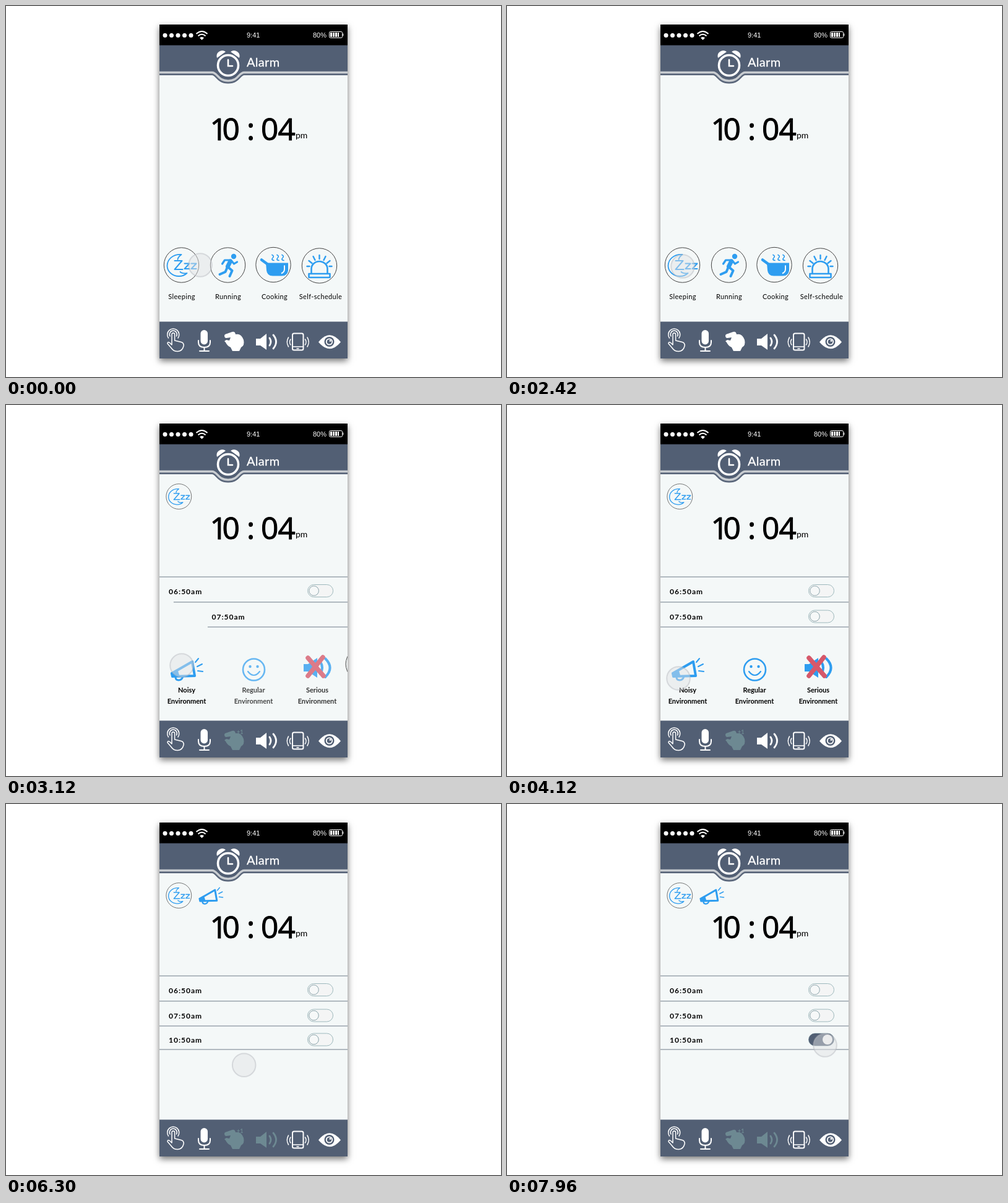
Animation, 800 px wide and 600 px high, one loop 8 s. Source, as an HTML page:

```html
<!DOCTYPE html>
<html lang="en">
<head>
<meta charset="utf-8">
<title>Alarm</title>
<style>
  html, body { margin: 0; width: 100%; height: 100%; overflow: hidden; background: #fff; }
  #phone { position: absolute; left: 248px; top: 30px; width: 304px; height: 540px; box-shadow: 0 4px 10px rgba(0, 0, 0, .55); }
  svg { position: absolute; left: 0; top: 0; font-family: Lato, "Open Sans", sans-serif; }
  .blue { fill: #2e9df0; }
  .line { fill: none; stroke: #2e9df0; stroke-linecap: round; stroke-linejoin: round; }
  .ring { fill: none; stroke: #444; }
  .label { font-size: 11px; letter-spacing: .35px; text-anchor: middle; }
  .bold { font-size: 11px; font-weight: 700; text-anchor: middle; }
  .time { font-size: 12px; font-weight: 700; letter-spacing: 1px; }
  .rule { stroke: #9ba5ae; stroke-width: 1.6; }
  .nav { color: #fff; }
  .nav .f { fill: currentColor; }
  .nav .s { fill: none; stroke: currentColor; stroke-width: 2; stroke-linecap: round; stroke-linejoin: round; }
  .nav .thin { stroke-width: 1.5; }
  .nav .thick { stroke-width: 2.8; }
  .clock { font: 49.5px "Open Sans", "Noto Sans", sans-serif; stroke: #000; stroke-width: 1; stroke-linejoin: round; }
  .status { font: 11px "Liberation Sans", Arial, sans-serif; fill: #fff; }
</style>
</head>
<body>
<div id="phone"></div>
<svg width="800" height="600" viewBox="0 0 800 600">
  <defs>
    <clipPath id="screen"><path d="M248 30H552V570H248Z"/></clipPath>
    <g id="zzz">
      <circle class="ring" r="28.2"/>
      <path class="line" stroke-width="1.8" d="M0-17C-14-18-23-9-23 1S-14 18-4 18C2 18 6 16 9 13C5 14 0 13-2 11M0-17C-4-14-6-12-6-9"/>
      <path class="line" stroke-width="2" d="M-11-7H1L-11 7H2M5-2.500H13L5 6H13M16-2.500H24L16 6H24"/>
    </g>
    <g id="runner">
      <circle class="ring" r="28.2"/>
      <circle class="blue" cx="9.5" cy="-14" r="4.2"/>
      <path class="line" stroke-width="7" d="M4-6L0 2"/>
      <path class="line" stroke-width="3.2" d="M5-8L10-2L15-5M3-8L-5-8L-9-2"/>
      <path class="line" stroke-width="4" d="M0 3L7 9L3 18M-1 4L-4 11L-13 15"/>
    </g>
    <g id="pan">
      <circle class="ring" r="28.2"/>
      <path class="line" stroke-width="4.500" d="M-19-8L-8 0"/>
      <path class="blue" d="M-12-3H24V9Q23 18 14 18H-1Q-10 18-11 9Z"/>
      <path fill="none" stroke="#fff" stroke-width="2" d="M18 1V7Q18 12 13 14"/>
      <path class="line" stroke-width="1.7" d="M-2-16q4 2 1 5t2 4M6-16q4 2 1 5t2 4M14-16q4 2 1 5t2 4"/>
    </g>
    <g id="siren">
      <circle class="ring" r="28.2"/>
      <path class="line" stroke-width="2.6" d="M-13 12V5A13 12 0 0 1 13 5V12M-17 13H17V19H-17Z"/>
      <path class="line" stroke-width="2.4" d="M0-17V-11M-10-15L-7-9M10-15L7-9M-17-8L-12-4M17-8L12-4M-20 1H-16M20 1H16"/>
    </g>
    <g id="megaphone">
      <path class="line" stroke-width="4" stroke-linejoin="miter" d="M-24 7L9-12L13 11L-23 12Z"/>
      <path class="blue" d="M-26 6L-15 0L-11 13H-24Z"/>
      <path class="line" stroke-width="3" d="M-18 13Q-18 18-13 18T-6 12"/>
      <path class="line" stroke-width="2" d="M14-11L19-17M17-4L25-8M18 3L26 4"/>
    </g>
    <g id="toggle">
      <rect x=".5" y="-10" width="41" height="20" rx="10" fill="#f4f5f5" stroke="#9db8bc"/>
      <circle cx="10.5" r="7.8" fill="#f6f8f8" stroke="#8aa3aa"/>
    </g>
  </defs>

  <g clip-path="url(#screen)">
    <path fill="#f4f8f8" d="M248 64H552V570H248Z"/>
    <path d="M248 30H552V64H248Z"/>
    <g fill="#fff">
      <circle cx="257" cy="47.5" r="3.5"/><circle cx="267.5" cy="47.5" r="3.5"/><circle cx="278" cy="47.5" r="3.5"/>
      <circle cx="288.5" cy="47.5" r="3.5"/><circle cx="299" cy="47.5" r="3.5"/>
      <path d="M313 51.5Q316.5 48.5 320 51.5L316.5 55Z"/>
      <path d="M524 43h3v7h-3zm4 0h3v7h-3zm4 0h3v7h-3zm4 0h2v7h-2zM544.5 44.5h1v4h-1z"/>
      <g fill="none" stroke="#fff">
        <path stroke-width="2" d="M307.5 45Q316.5 37 325.5 45M310.5 48.5Q316.5 43 322.5 48.5"/>
        <rect x="522.5" y="41.5" width="21" height="10" rx="2"/>
      </g>
    </g>
    <text class="status" x="389" y="51">9:41</text>
    <text class="status" x="496" y="51">80%</text>

    <path fill="none" stroke="#5b677b" stroke-width="7" d="M240 108.5H333C342 108.5 342 122 359 122S376 108.5 385 108.5H560"/>
    <path fill="#525f74" stroke="#c9cdd1" stroke-width="3.4" d="M240 61V107.5H333C342 107.5 342 121 359 121S376 107.5 385 107.5H560V61Z"/>
    <path d="M248 58H552V63.5H248Z"/>
    <g fill="none" stroke="#fff" stroke-linecap="round">
      <circle cx="359" cy="96" r="16.5" stroke-width="3.6"/>
      <path stroke-width="2.6" d="M359 87V97H366"/>
      <path fill="#fff" stroke="none" d="M341 84A9 9 0 0 1 355 74ZM377 84A9 9 0 0 0 363 74Z"/>
    </g>
    <text x="389" y="98" font-size="20" letter-spacing=".3" fill="#fff" stroke="#fff" stroke-width=".3">Alarm</text>

    <text class="clock" x="329.5 349.5 389 412 439.5" y="216.5">10:04</text>
    <text x="468" y="214" font-size="14">pm</text>

    <use id="fly" href="#megaphone"/>
    <g id="rows"></g>
    <g id="self"><use href="#siren" x="506.5" y="420"/><text class="label" x="508.5" y="474">Self-schedule</text></g>
    <g id="cook"><use href="#pan" x="432" y="418.5"/><text class="label" x="434" y="474">Cooking</text></g>
    <g id="run"><use href="#runner" x="358.5" y="419"/><text class="label" x="359" y="474">Running</text></g>
    <text id="sleepLabel" class="label" x="284" y="474">Sleeping</text>

    <g id="noisy">
      <use href="#megaphone" x="292" y="427"/>
      <text class="bold" x="292" y="465">Noisy</text><text class="bold" x="292" y="483">Environment</text>
    </g>
    <g id="regular">
      <circle class="line" stroke-width="2.6" cx="400.5" cy="428" r="17.5"/>
      <circle class="blue" cx="394.5" cy="423" r="2.2"/><circle class="blue" cx="406.5" cy="423" r="2.2"/>
      <path class="line" stroke-width="2.2" d="M391 431Q400.5 443 410 431"/>
      <text class="bold" x="400" y="465">Regular</text><text class="bold" x="400" y="483">Environment</text>
    </g>
    <g id="serious">
      <path class="blue" d="M481 419H488L503 409V441L488 431H481Z"/>
      <path class="line" stroke-width="4" d="M508 415Q514 425 508 435M516 410Q531 425 516 440"/>
      <path fill="none" stroke="#d6586a" stroke-width="7.5" stroke-linecap="round" d="M488 409L513 438M512 408L488 438"/>
      <text class="bold" x="503" y="465">Serious</text><text class="bold" x="503" y="483">Environment</text>
    </g>
    <use id="sleep" href="#zzz"/>

    <path fill="#525f74" d="M248 510.5H552V570H248Z"/>
    <text x="286" y="576.5" font-size="10" letter-spacing=".5" fill="#fff" opacity=".5">Alarm modes and hints</text>
    <g class="nav">
      <path class="s thin" d="M268 548V531a2.3 2.3 0 0 1 4.600 0V541L283 543.500Q288 545 287 550Q285 558 278 558.500Q271 559 267 553L261 546Q261 542 265 545L268 548M265 534a6 6 0 1 1 10.500 0M262.500 537a9.500 9.500 0 1 1 15.500 0"/>
    </g>
    <g class="nav">
      <rect class="f" x="314.5" y="524" width="11.5" height="23.5" rx="5.7"/>
      <path class="s" d="M311 541V544Q311 552 320.5 552T330 544V541M320.5 552V557M313 558H328"/>
    </g>
    <g class="nav" id="pinch">
      <path class="f" d="M353 533Q353 531 357 530L364 527.5Q370 525 371 531Q380 529 384 540Q386 549 380 552L377 558H366L363 552Q357 549 355 544L353 542L356 540L361 541L363 536L356 537Q353 537 353 533Z"/>
      <text id="plus" class="f" x="373" y="532" font-size="9" font-weight="700">+1</text>
    </g>
    <g class="nav" id="sound">
      <path class="f" d="M404 538H411L421 530V556L411 549H404Z"/>
      <path class="s thick" d="M426 537Q430 543 426 549M432 532Q441 543 432 554"/>
    </g>
    <g class="nav">
      <rect class="s" x="463" y="529.5" width="17.5" height="27" rx="2.5"/>
      <path class="s thin" d="M463 551H480M470 554H473M460 539Q457 543.5 460 548M456.5 536Q452 543.5 456.5 551M483.5 539Q486.5 543.5 483.5 548M487 536Q491.5 543.5 487 551"/>
    </g>
    <g class="nav">
      <path class="f" d="M505 543.5Q523 521 541 543.5Q523 565 505 543.5Z"/>
      <circle cx="522.5" cy="543" r="8" fill="#525f74"/><circle class="f" cx="522.5" cy="543" r="5.6"/>
      <circle cx="522.5" cy="543" r="3.8" fill="#525f74"/><circle class="f" cx="524" cy="541.5" r="1.4"/>
    </g>

    <g id="active">
      <rect x="487.5" y="371" width="41" height="20" rx="10" fill="#525f74"/>
      <circle id="knob" cy="381" r="8" fill="#f4f5f5"/>
    </g>
    <circle id="touch" r="18.8" fill="#e0e1e4" fill-opacity=".48" stroke="#b4b5bc" stroke-opacity=".45" stroke-width="2"/>
  </g>
</svg>
<script>
const LOOP = 8000, WIDTH = 304;
const $ = id => document.getElementById(id);
const ease = p => p < .5 ? 2 * p * p : 1 - 2 * (1 - p) ** 2;
const tween = (t, start, length) => ease(Math.min(1, Math.max(0, (t - start) / length)));
const mix = (a, b, p) => a + (b - a) * p;
const place = (id, x, y = 0, scale = 1, turn = 0) =>
  $(id).setAttribute('transform', `translate(${x} ${y}) rotate(${turn}) scale(${scale})`);
const fade = (id, opacity) => $(id).setAttribute('opacity', opacity);

// Parts of the alarm list that slide in from the right: markup and start time.
const rule = y => `<path class="rule" d="M248 ${y}H552"/>`;
const entry = (time, y) =>
  `<text class="time" x="263" y="${y + 5}">${time}</text><use href="#toggle" x="487" y="${y}"/>`;
const rows = [
  [rule(278), 2578], [entry('06:50am', 300.5), 2628], [rule(318.7), 2718],
  [entry('07:50am', 342), 2790], [rule(359), 2800],
  [entry('10:50am', 381), 5203], [rule(397), 5203]
];
$('rows').innerHTML = rows.map(([markup]) => `<g>${markup}</g>`).join('');

// Touch point: time, x, y.
const touches = [
  [0, 314, 419], [700, 252, 434], [1300, 250, 438], [1500, 254, 436], [1660, 284, 424],
  [2480, 284, 421], [3300, 284, 421], [3700, 273, 436], [4100, 277, 442], [5000, 277, 442],
  [5300, 289, 443], [6140, 289, 448], [6460, 478, 397], [6760, 478, 397],
  [7500, 517, 390], [7800, 517, 390], [7960, 514, 390], [LOOP, 514, 390]
];

function draw(t) {
  rows.forEach(([, start], i) =>
    $('rows').children[i].setAttribute('transform', `translate(${WIDTH * (1 - tween(t, start, 500))} 0)`));

  place('self', 340 * tween(t, 2500, 400));
  place('cook', 320 * tween(t, 2764, 400));
  place('run', 320 * tween(t, 2880, 400));
  fade('sleepLabel', 1 - tween(t, 2480, 200));

  const rise = tween(t, 2578, 500);
  place('sleep', mix(283.5, 279.3, rise), mix(419, 148, rise), mix(1, .725, rise));

  const leave = 1 - tween(t, 5400, 290);
  fade('noisy', tween(t, 2520, 300) * leave);
  fade('serious', tween(t, 2840, 420) * leave);
  fade('regular', tween(t, 2880, 390) * leave);
  place('noisy', -60 * (1 - tween(t, 2480, 420)));

  const lift = tween(t, 5203, 490);
  fade('fly', t < 5203 ? 0 : 1);
  place('fly', mix(292, 331, lift), mix(427, 148, lift), mix(1, .75, lift), -11 * Math.sin(Math.PI * lift));

  const used = (id, on) => $(id).style.color = on ? '#6d8992' : '#fff';
  used('pinch', t >= 2500);
  used('sound', t >= 4960);
  fade('plus', t >= 2500 ? 1 : 0);

  const on = tween(t, 7600, 200);
  fade('active', on);
  $('knob').setAttribute('cx', mix(497.5, 518, on));

  const i = touches.findIndex(([time]) => time > t);
  const [t0, x0, y0] = touches[i - 1], [t1, x1, y1] = touches[i];
  const p = tween(t, t0, t1 - t0);
  place('touch', mix(x0, x1, p), mix(y0, y1, p));
}

function frame() {
  draw(performance.now() % LOOP);
  requestAnimationFrame(frame);
}
frame();
</script>
</body>
</html>
```
